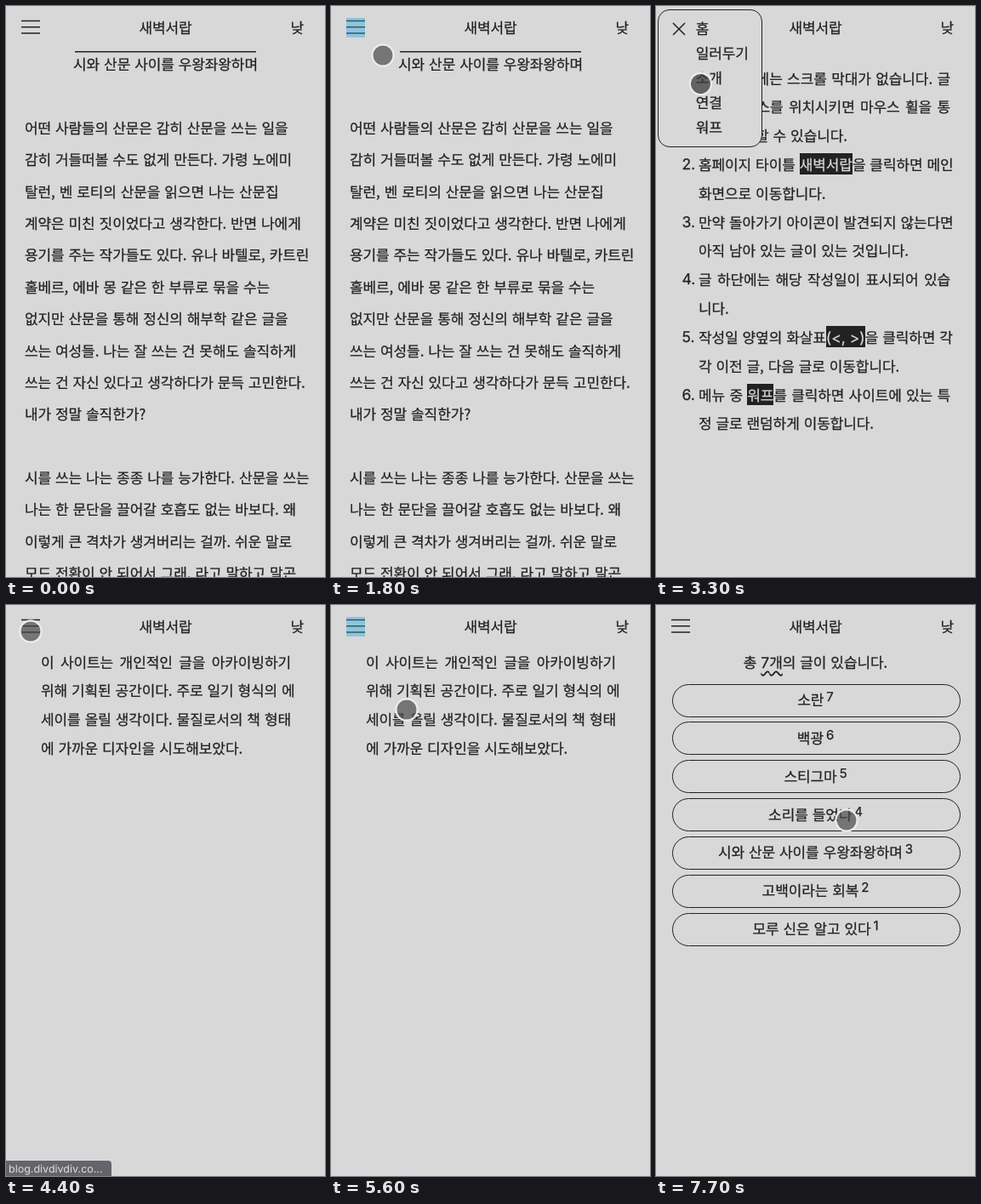
These frames come from a looping animation (375 by 671 pixels, 7.8 s). An HTML page:

```html
<!DOCTYPE html>
<html lang="ko">
<head>
<meta charset="utf-8">
<style>
  html, body { margin: 0; width: 100%; height: 100%; overflow: hidden; background: #d8d8d8; }
  #stage {
    position: relative; width: 375px; height: 671px; overflow: hidden;
    background: #d8d8d8; color: #222;
    font: 17px/30px "Noto Sans CJK KR", "Noto Sans CJK", sans-serif;
    letter-spacing: -.1px; word-spacing: .3px;
    text-rendering: geometricPrecision; -webkit-text-stroke: .25px;
  }
  #stage div, #stage svg { position: absolute; box-sizing: border-box; white-space: nowrap; }
  .page { inset: 0; }
  .fit { text-align: justify; text-align-last: justify; }
  .mid { left: 0; width: 375px; text-align: center; }
  .latin { font-family: Inter, sans-serif; font-size: 17.5px; letter-spacing: 0; word-spacing: 0; }
  mark { background: #222; color: #d8d8d8; }
  u { text-decoration-thickness: 1.4px; text-underline-offset: 2.5px; }
  .wavy { text-decoration: underline wavy 1.8px; text-underline-offset: 3px; }
  .pill { left: 18.5px; width: 339px; height: 39px; border: 1.2px solid #222; border-radius: 20px; }
  sup { font: 15px/1 Inter, sans-serif; margin-left: 3px; position: relative; top: -5px; vertical-align: baseline; }
  #menu { left: 2px; top: 4px; width: 123px; height: 162px; border: 1.3px solid #222; border-radius: 14px; background: #d8d8d8; }
  #status {
    left: 0; top: 653px; width: 124px; height: 20px; border-radius: 0 4px 0 0; background: #646569;
    color: #dedede; font: 12.5px/21px Inter, sans-serif; padding-left: 3px; letter-spacing: 0; word-spacing: 0;
    -webkit-text-stroke: 0;
  }
  #cursor { left: 0; top: 0; overflow: visible; }
</style>
</head>
<body>
<div id="stage">
  <div id="home" class="page">
    <svg width="375" height="60" style="left:0;top:0"><path d="M81 53.8h213" stroke="#222" stroke-width="1.4"/></svg>
  </div>
  <div id="guide" class="page"></div>
  <div id="about" class="page"></div>
  <div id="contact" class="page"></div>
  <div id="list" class="page"></div>
  <div id="head" class="page">
    <svg width="60" height="50" style="left:0;top:0" fill="none" stroke-width="1.5">
      <rect id="glow" x="18" y="14" width="22" height="23" fill="#8fc4d9"/>
      <path id="bars" d="M18 17.5h22M18 24.7h22M18 32h22"/>
    </svg>
  </div>
  <div id="menu">
    <svg width="40" height="40" style="left:-3.3px;top:-5.3px" stroke="#222" stroke-width="1.5"><path d="M20 20l14 14M34 20L20 34"/></svg>
  </div>
  <div id="status">blog.divdivdiv.co...</div>
  <svg id="cursor" width="1" height="1">
    <g id="dot">
      <circle id="disc" r="11.7"/>
      <circle r="12.6" fill="none" stroke="#ececec" stroke-width="2.2"/>
    </g>
  </svg>
</div>
<script>
const $ = id => document.getElementById(id);
const LOOP = 7800, STEP = 100;

// Adds one line whose glyphs are centred on y
function line(parent, y, html, { x, w, cls = "" } = {}) {
  const el = document.createElement("div");
  el.className = x === undefined ? "mid " + cls : cls;
  el.style.top = y - 16 + "px";
  if (x !== undefined) el.style.left = x + "px";
  if (w) { el.style.width = w + "px"; el.classList.add("fit"); }
  el.innerHTML = html;
  $(parent).append(el);
  return el;
}

const TITLE = "새벽서랍";
line("head", 26, TITLE);
line("head", 26, "낮", { x: 334.5 });

// Article
line("home", 69, "시와 산문 사이를 우왕좌왕하며");
[
  "어떤 사람들의 산문은 감히 산문을 쓰는 일을",
  "감히 거들떠볼 수도 없게 만든다. 가령 노에미",
  "탈런, 벤 로티의 산문을 읽으면 나는 산문집",
  "계약은 미친 짓이었다고 생각한다. 반면 나에게",
  "용기를 주는 작가들도 있다. 유나 바텔로, 카트린",
  "홀베르, 에바 몽 같은 한 부류로 묶을 수는",
  "없지만 산문을 통해 정신의 해부학 같은 글을",
  "쓰는 여성들. 나는 잘 쓰는 건 못해도 솔직하게",
  "쓰는 건 자신 있다고 생각하다가 문득 고민한다.",
  "내가 정말 솔직한가?",
  "",
  "시를 쓰는 나는 종종 나를 능가한다. 산문을 쓰는",
  "나는 한 문단을 끌어갈 호흡도 없는 바보다. 왜",
  "이렇게 큰 격차가 생겨버리는 걸까. 쉬운 말로",
  "모드 전환이 안 되어서 그래, 라고 말하고 말곤"
].forEach((s, i) => line("home", 144 + i * 37.36, s, { x: 22 }));

// Guide: a leading number opens an item, a trailing slash keeps the line unjustified
[
  "1|이 사이트에는 스크롤 막대가 없습니다. 글",
  "위에 마우스를 위치시키면 마우스 휠을 통",
  "해 스크롤할 수 있습니다./",
  `2|홈페이지 타이틀 <mark>${TITLE}</mark>을 클릭하면 메인`,
  "화면으로 이동합니다./",
  "3|만약 돌아가기 아이콘이 발견되지 않는다면",
  "아직 남아 있는 글이 있는 것입니다./",
  "4|글 하단에는 해당 작성일이 표시되어 있습",
  "니다./",
  '5|작성일 양옆의 화살표<mark><span class="latin">(&lt;, &gt;)</span></mark>을 클릭하면 각',
  "각 이전 글, 다음 글로 이동합니다./",
  "6|메뉴 중 <mark>워프</mark>를 클릭하면 사이트에 있는 특",
  "정 글로 랜덤하게 이동합니다./"
].forEach((s, i) => {
  const y = 85.5 + i * 33.83;
  const item = s.match(/^(\d)\|(.*)$/);
  const text = item ? item[2] : s;
  if (item) line("guide", y + 1, item[1] + ".", { x: 30.5, cls: "latin" });
  if (text.endsWith("/")) line("guide", y, text.slice(0, -1), { x: 50 });
  else line("guide", y, text, { x: 50, w: 296 });
});

// About
[
  "이 사이트는 개인적인 글을 아카이빙하기",
  "위해 기획된 공간이다. 주로 일기 형식의 에",
  "세이를 올릴 생각이다. 물질로서의 책 형태",
  "에 가까운 디자인을 시도해보았다."
].forEach((s, i) => line("about", 67.5 + i * 33.8, s, { x: 41, w: i < 3 ? 294 : 0 }));

// Contact
line("contact", 140.5, "<u>이메일</u>");
line("contact", 171.5, "<mark>nabiyu@orem.test</mark>", { cls: "latin" });
line("contact", 226.5, "<u>SNS</u>", { cls: "latin" });
line("contact", 256, "<mark>Modigrelo</mark>", { cls: "latin" });

// List
line("list", 68, '총 <span class="wavy"><span class="latin">7</span>개</span>의 글이 있습니다.');
["소란", "백광", "스티그마", "소리를 들었다", "시와 산문 사이를 우왕좌왕하며", "고백이라는 회복", "모루 신은 알고 있다"]
  .forEach((s, i) => {
    const y = 112 + i * 44.85;
    line("list", y, "", { x: 18.5, cls: "pill" }).style.top = y - 19.5 + "px";
    line("list", y, `${s}<sup>${7 - i}</sup>`);
  });

["홈", "일러두기", "소개", "연결", "워프"]
  .forEach((s, i) => line("menu", 22 + i * 29.1, s, { x: 43.7 }));

// Timeline in ms
const pages = [["home", 0], ["guide", 2000], ["about", 3700], ["contact", 5700], ["list", 6900]];
const menus = [[1100, 1800], [2700, 3500], [4600, 5500]];
const hints = [[2200, 2900], [4200, 4900], [5800, 6500], [6700, 7700]];
const glows = [[1800, 2000], [3500, 3700], [5500, 5700]];
const presses = [[3300, 3500]];
const path = [
  [100, 150, 89], [200, 262, 623], [300, 336, 542], [400, 336, 542],
  [1000, 29, 29], [1200, 29, 29], [1600, 61, 58], [1800, 61, 58],
  [2200, 29, 31], [2600, 29, 31], [3200, 52.5, 91.5], [3600, 52.5, 91.5],
  [4200, 29, 31], [4500, 29, 31], [5000, 58, 125], [5300, 63, 115], [5400, 63, 115],
  [5600, 89, 123], [5900, 225, 250], [6100, 225, 250], [6500, 217, 35], [6600, 217, 35],
  [6700, 213, 28.5], [6800, 213, 28.5], [7200, 224, 253], [7800, 224, 253]
];

const clamp = v => Math.max(0, Math.min(1, v));
const within = (spans, t) => spans.find(([a, b]) => t >= a && t < b);
const ease = p => p * p * (3 - 2 * p);

function place(t) {
  const i = path.findIndex(k => k[0] > t);
  const [t0, x0, y0] = path[i - 1], [t1, x1, y1] = path[i];
  const p = ease((t - t0) / (t1 - t0));
  return [x0 + (x1 - x0) * p, y0 + (y1 - y0) * p];
}

function draw(t) {
  const page = pages.filter(p => p[1] <= t).pop()[0];
  for (const [id] of pages) $(id).style.display = id === page ? "" : "none";

  const glow = within(glows, t);
  $("glow").style.opacity = glow ? 1 : 0;
  $("bars").setAttribute("stroke", glow ? "#2b5c70" : "#222");

  const menu = within(menus, t);
  $("menu").style.opacity = menu ? clamp((t - menu[0] + STEP) / 300) : 0;

  const hint = within(hints, t);
  $("status").style.opacity = hint ? clamp(Math.min((t - hint[0] + STEP) / 200, (hint[1] - t) / 300)) : 0;

  const shown = t >= path[0][0];
  $("cursor").style.display = shown ? "" : "none";
  if (shown) {
    $("dot").setAttribute("transform", `translate(${place(t)})`);
    $("disc").setAttribute("fill", within(presses, t) ? "rgba(60,60,60,.75)" : "rgba(75,75,75,.7)");
  }
}

const start = performance.now();
function tick() {
  const t = (performance.now() - start) % LOOP;
  draw(Math.floor(t / STEP) * STEP);
  requestAnimationFrame(tick);
}
tick();
</script>
</body>
</html>
```
